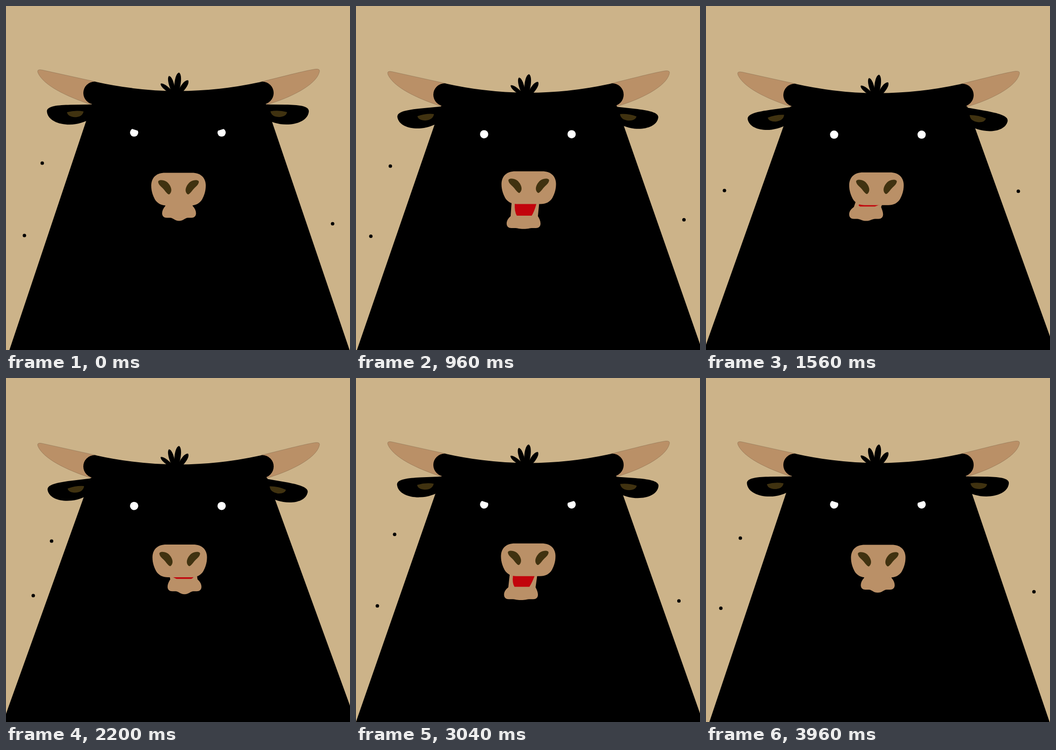
Animation of 694 by 694 pixels, one loop 4000 ms. Source, as an HTML page:

```html
<!DOCTYPE html>
<html lang="en">
<head>
<meta charset="utf-8">
<title>Chewing bull</title>
<style>
  html, body { margin: 0; width: 100%; height: 100%; overflow: hidden; background: #ccb389; }
  svg { display: block; width: 100%; height: 100%; }
  .tan { fill: #ba9067; }
  .brown { fill: #403210; }
  .edge { stroke: #000; stroke-opacity: .25; stroke-width: .7; }
</style>
</head>
<body>
<svg viewBox="0 0 694 694">
  <defs>
    <path id="ear" d="M180 198.500 L130 199 C105 199.500 82.500 201 82.500 212 C83.500 230 106 239 128 239 C145 239 158 234 172 227 L182 220 Z"/>
    <path id="inner" class="brown" d="M123 214 Q140 209.500 156.500 212.500 Q154 224 138 224 Q124 222.500 123 214 Z"/>
    <path id="nostril" class="brown" d="M-41 19 C-42 14 -32 13 -24 18 C-15 25 -11 37 -18 43 C-21 46 -27 36 -32 31 C-36 27 -40 24 -41 19 Z"/>
    <path id="blade" d="M-3 0 C-7 -14 -7 -38 0 -41 C7 -38 7 -14 3 0 Z"/>
  </defs>
  <rect width="694" height="694" fill="#ccb389"/>
  <g id="flies"><circle r="3.5"/><circle r="3.5"/><circle r="3.5"/></g>
  <path id="body"/>
  <g id="head">
    <path class="tan edge" d="M182 153 L73 129 Q61 126.500 64.500 135 C76 160 120 182 172 199 Z"/>
    <path class="tan edge" d="M514 153 C560 142 600 131 624 127.300 Q635 126 632 134 C625 160 572 186 526 199 Z"/>
    <path d="M179 152.500 Q348 190.500 517 152.500 A23 23 0 0 1 517 198.500 H179 A23 23 0 0 1 179 152.500 Z"/>
    <g id="earL"><use href="#ear"/><use href="#inner"/></g>
    <g transform="translate(693.500 0) scale(-1 1)">
      <g id="earR"><use href="#ear"/><use href="#inner" x="3.5"/></g>
    </g>
    <g id="hair">
      <use href="#blade" transform="translate(336 176) rotate(-51) scale(.75 .75)"/>
      <use href="#blade" transform="translate(339 176) rotate(-16) scale(.9 .89)"/>
      <use href="#blade" transform="translate(343.500 176) rotate(7.500) scale(1.1 1.03)"/>
      <use href="#blade" transform="translate(349 176) rotate(35) scale(.95 .78)"/>
    </g>
    <g fill="#fff"><circle cx="258.500" cy="255.300" r="8.300"/><circle cx="435" cy="255.300" r="8.300"/></g>
    <path id="lidL" d="M-14 -14 H14 V0 H-14 Z"/>
    <path id="lidR" d="M-14 -14 H14 V0 H-14 Z"/>
  </g>
  <path id="jaw" class="tan"/>
  <path id="mouth" fill="#c2040c"/>
  <g id="muzzle">
    <path class="tan" d="M-27 0 H27 C45 0 55 10 55 26 C55 38 51 47 48 53 C43 62 34 66 24 66 H-24 C-34 66 -43 62 -48 53 C-51 47 -55 38 -55 26 C-55 10 -45 0 -27 0 Z"/>
    <use href="#nostril"/>
    <use href="#nostril" transform="scale(-1 1)"/>
  </g>
</svg>
<script>
const LOOP = 4000, CHEW = 2000, BUZZ = 1000;
const $ = id => document.getElementById(id);
const set = (el, name, value) => el.setAttribute(name, value);
const move = (id, value) => set($(id), 'transform', value);

// Cosine of a phase counted in whole turns.
const turn = p => Math.cos(2 * Math.PI * p);
const wave = (t, shift) => turn((t + shift) / LOOP);

// Closed smooth path through points that are evenly spaced in time.
function along(points, phase) {
  const n = points.length, s = phase * n, i = Math.floor(s), u = s - i;
  const [a, b, c, d] = [-1, 0, 1, 2].map(k => points[(i + k + n) % n]);
  return [0, 1].map(k => b[k] + u / 2 * (c[k] - a[k]
    + u * (2 * a[k] - 5 * b[k] + 4 * c[k] - d[k] + u * (3 * (b[k] - c[k]) + d[k] - a[k]))));
}

const flyPaths = [
  [[73, 317], [92, 329], [50, 355], [37, 374], [54, 364]],
  [[37, 463], [55, 439], [20, 420], [-12, 428], [-4, 460]],
  [[659, 439], [615, 480], [667, 365], [625, 379], [655, 402]]
];

function drawFlies(t) {
  [...$('flies').children].forEach((fly, i) => {
    const [x, y] = along(flyPaths[i], t % BUZZ / BUZZ);
    set(fly, 'cx', x);
    set(fly, 'cy', y);
  });
}

function drawBody(t) {
  const spread = 6.5 * wave(t, -100), top = 25 / 539;
  const left = .5 + spread, right = 699.5 - spread;
  const xl = 187.5 + (left - 187.5) * top, xr = 510 + (right - 510) * top;
  set($('body'), 'd', `M${xl} 180 H${xr} L${right} 694 H${left} Z`);
}

function drawHead(t) {
  const nod = wave(t, 500);
  move('head', `translate(0 ${1.77 - 2.5 * nod})`);
  move('earL', `rotate(${3.6 * wave(t, 270) - 3.6} 180 205)`);
  move('earR', `rotate(${5 * wave(t, 130) - 5} 180 205)`);
  const sway = Math.exp(-(((t - 2720) / 220) ** 2));
  move('hair', `rotate(${-8 * sway} 343 175)`);
  const lid = 250 - 5 * (.75 - nod);
  move('lidL', `translate(260 ${lid}) rotate(18)`);
  move('lidR', `translate(433.5 ${lid}) rotate(-18)`);
}

function drawMouth(t) {
  const p = t / CHEW, open = turn(p - .43);
  const mx = 348 + 4.2 * turn(p - .25), my = 335.1 - 1.5 * turn(p - .46);
  const jx = 342.3 + 22 * turn(p - .2), low = 434.9 + 11 * open + 2.8 * open * open;
  const chin = 4 + 2.2 * turn(p - .02);
  const lean = mx - jx, neck = .4 * lean, joint = .13 * lean;

  move('muzzle', `translate(${mx} ${my})`);
  move('jaw', `translate(${jx} ${low})`);
  set($('jaw'), 'd', `M${neck - 28} ${391 - low} L${joint - 27.5} -24
    C-32 -19 -34.2 -14 -34.2 -9 C-34.2 -3 -30 0 -25 0 H-18
    C-12 0 -9 ${chin} 0 ${chin} C9 ${chin} 12 0 18 0 H25
    C30 0 34.2 -3 34.2 -9 C34.2 -14 32 -19 ${joint + 27.5} -24 L${neck + 28} ${391 - low} Z`);

  const lip = low - 25, top = my + 64.5, x = jx + neck, bx = jx + joint;
  const round = Math.min(7, (lip - top) / 2);
  set($('mouth'), 'd', lip < my + 66.5 ? '' : `M${x - 22} ${top} H${x + 22}
    Q${bx + 20} ${lip - round} ${bx + 15} ${lip} H${bx - 15}
    Q${bx - 20} ${lip - round} ${x - 22} ${top} Z`);
}

function draw(t) {
  drawFlies(t);
  drawBody(t);
  drawHead(t);
  drawMouth(t);
}

const start = performance.now();
function tick() {
  draw((performance.now() - start) % LOOP);
  requestAnimationFrame(tick);
}
draw(0);
requestAnimationFrame(tick);
</script>
</body>
</html>
```
